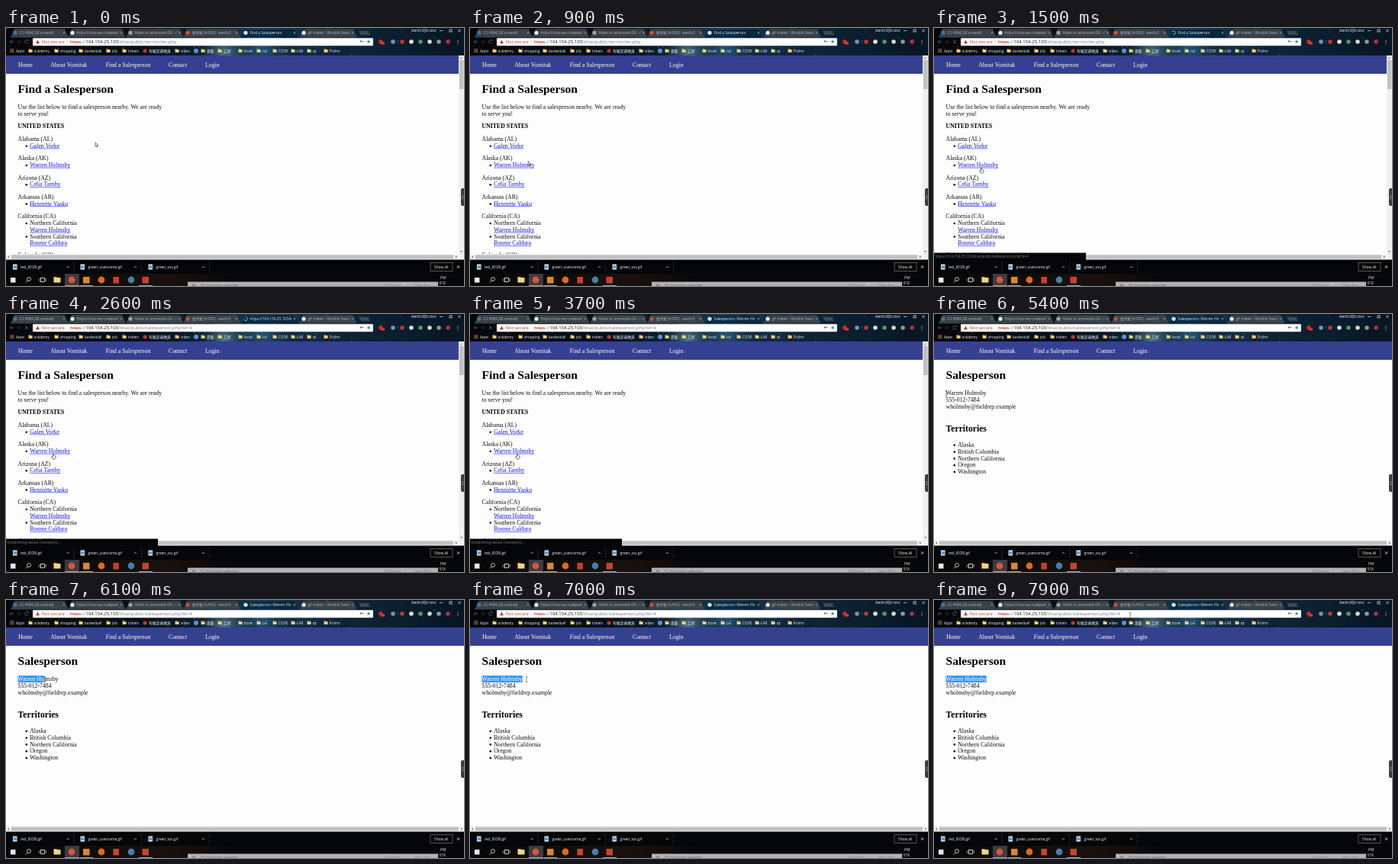
An HTML page with a canvas for the animation above (8 s loop, 600x338 px).

```html
<!DOCTYPE html>
<html lang="en">
<head>
<meta charset="utf-8">
<title>Find a Salesperson</title>
<style>
html, body { margin: 0; width: 100%; height: 100%; overflow: hidden; background: #000; }
canvas { display: block; width: 600px; height: 338px; }
</style>
</head>
<body>
<canvas id="stage" width="600" height="338"></canvas>
<script>
const g = document.getElementById('stage').getContext('2d');
const LOOP = 8000, STEP = 100;
const UI = '"Open Sans", "Noto Sans CJK TC", "Noto Sans CJK", sans-serif';
const SERIF = '"Liberation Serif", "Times New Roman", serif';
const BODY = 7.78;
const HOST = '104.154.25.103';
const PERSON = 'Warren Holmsby';

// Moments of the story, in ms
const CLICK = 1400, NAVIGATE = 2000, TITLED = 3200, LOADED = 4200, DRAG = 5500;

// Pointer path: time, x, y
const PATH = [
  [0, 117, 150], [300, 117, 150], [1200, 62, 183], [3900, 62, 183],
  [4600, 20, 106], [5200, 16, 104], [DRAG, 16, 104], [6100, 51, 104],
  [6500, 71, 104], [7000, 74, 104], [7800, 257, 20], [LOOP, 257, 20]
];

function box(x, y, w, h, color) {
  g.fillStyle = color;
  g.fillRect(x, y, w, h);
}

function dot(x, y, r, color) {
  g.fillStyle = color;
  g.beginPath();
  g.arc(x, y, r, 0, Math.PI * 2);
  g.fill();
}

function line(points, color, width = 0.8) {
  g.strokeStyle = color;
  g.lineWidth = width;
  g.beginPath();
  points.forEach(([x, y], i) => i ? g.lineTo(x, y) : g.moveTo(x, y));
  g.stroke();
}

function shape(points, color) {
  g.fillStyle = color;
  g.beginPath();
  points.forEach(([x, y]) => g.lineTo(x, y));
  g.closePath();
  g.fill();
}

function cross(x, y, r, color, width) {
  line([[x - r, y - r], [x + r, y + r]], color, width);
  line([[x + r, y - r], [x - r, y + r]], color, width);
}

function write(s, x, y, color, size = 4.8, family = UI, weight = '') {
  g.font = `${weight} ${size}px ${family}`;
  g.fillStyle = color;
  g.fillText(s, x, y);
  return x + g.measureText(s).width;
}

const serif = (s, x, y, color = '#111', size = BODY, weight = '') =>
  write(s, x, y, color, size, SERIF, weight);

function link(s, x, y) {
  const end = serif(s, x, y, '#1515e0');
  line([[x, y + 1], [end, y + 1]], '#1515e0', 0.6);
}

function seeded(seed) {
  return () => (seed = (seed * 16807) % 2147483647) / 2147483647;
}

function pointer(t) {
  const i = Math.max(1, PATH.findIndex(p => p[0] > t));
  const [a, ax, ay] = PATH[i - 1], [b, bx, by] = PATH[i];
  const u = (t - a) / (b - a), e = u * u * (3 - 2 * u);
  return [ax + (bx - ax) * e, ay + (by - ay) * e];
}

function sky() {
  const base = g.createLinearGradient(0, 0, 600, 0);
  base.addColorStop(0, '#05070a');
  base.addColorStop(0.3, '#07101a');
  base.addColorStop(0.55, '#12304a');
  base.addColorStop(1, '#081522');
  box(0, 0, 600, 36, base);
  const glow = (x, y, r, color) => {
    const f = g.createRadialGradient(x, y, 0, x, y, r);
    f.addColorStop(0, color);
    f.addColorStop(1, 'rgba(0,0,0,0)');
    box(0, 0, 600, 36, f);
  };
  glow(335, 24, 90, 'rgba(40,100,140,.7)');
  glow(285, 33, 45, 'rgba(120,170,195,.6)');
  glow(400, 10, 60, 'rgba(30,75,110,.6)');
  const rnd = seeded(77);
  for (let i = 0; i < 160; i++) {
    const x = i % 2 ? rnd() * 600 : 230 + rnd() * 200;
    dot(x, rnd() * 36, 0.2 + rnd() * 0.5, `rgba(190,220,240,${0.2 + rnd() * 0.6})`);
  }
}

function tab(x, title, icon, active) {
  const edge = [[x - 6, 12.5], [x - 1, 1], [x + 65, 1], [x + 70, 12.5]];
  shape(edge, active ? 'rgba(8,36,56,.75)' : '#3a4147');
  line(edge, active ? '#294657' : '#1d2226', 0.6);
  if (icon) dot(x, 6.3, 2.6, icon);
  g.save();
  g.beginPath();
  g.rect(x + 5, 0, 55, 12);
  g.clip();
  write(title, x + 5.5, 8, active ? '#d8ecf4' : '#aab4ba');
  g.restore();
  cross(x + 64, 6.3, 1.3, active ? '#d0dde2' : '#aab4ba', 0.6);
}

function tabs(t) {
  tab(12, 'CS 4984 (28 unread)', '#3b75a8');
  tab(87, 'https://courses.codepath', '#e8e8e8');
  tab(163, 'Video to animated GIF - c', '#9aa3a8');
  tab(238, '收件匣 (4,000) - wenlo3', '#d54b3e');
  tab(390, 'gif maker - Woobik Searc', '#e9e9e9');
  const waiting = t >= CLICK && t < TITLED;
  const title = t < NAVIGATE ? 'Find a Salesperson'
    : t < TITLED ? `https://${HOST}/blue` : 'Salesperson: ' + PERSON;
  tab(314, title, waiting ? '' : '#d7e4e8', true);
  if (waiting) {
    const a = t / 150;
    g.strokeStyle = '#9fc7dc';
    g.lineWidth = 0.9;
    g.beginPath();
    g.arc(314, 6.3, 2.3, a, a + 4.4);
    g.stroke();
  }
  shape([[462, 4], [474, 4], [477, 9], [465, 9]], 'rgba(90,100,108,.6)');
  write('wenlo3@z.test', 531, 5, '#eef');
  line([[568, 3.5], [572, 3.5]], '#eee', 0.7);
  g.strokeStyle = '#eee';
  g.strokeRect(581, 2, 3, 3);
  cross(594, 3.5, 1.7, '#eee', 0.7);
}

function toolbar(t) {
  const ink = '#596068', faint = '#2c3136';
  line([[10, 18], [5, 18], [7.5, 15.7]], ink);
  line([[5, 18], [7.5, 20.3]], ink);
  line([[14, 18], [19, 18], [16.5, 15.7]], faint);
  line([[19, 18], [16.5, 20.3]], faint);
  if (t >= CLICK && t < LOADED) {
    cross(27, 18, 2, ink, 0.9);
  } else {
    g.strokeStyle = ink;
    g.lineWidth = 0.8;
    g.beginPath();
    g.arc(27, 18, 2.3, 0.4, 5.4);
    g.stroke();
    shape([[27.5, 16.8], [29.8, 16.8], [29.8, 14.5]], ink);
  }
  g.fillStyle = '#fff';
  g.beginPath();
  g.roundRect(35, 13.2, 446, 10, 1.2);
  g.fill();
  shape([[41.5, 15.6], [44, 20.2], [39, 20.2]], '#c8392b');
  write('Not secure', 46.5, 20.2, '#c8392b', 6);
  line([[80.5, 15], [80.5, 21.5]], '#ccc', 0.5);
  let x = write('https', 84, 20.2, '#c8392b', 6);
  line([[84, 18.5], [x, 18.5]], '#c8392b', 0.5);
  x = write('://', x, 20.2, '#777', 6);
  x = write(HOST, x, 20.2, '#111', 6);
  write('/blue/public/' + (t < NAVIGATE ? 'territories.php' : 'salesperson.php?id=4'), x, 20.2, '#777', 6);
  dot(465, 17.5, 1.2, '#777');
  line([[466, 17.5], [469, 17.5]], '#777');
  shape(Array.from({ length: 10 }, (_, i) => {
    const a = i * Math.PI / 5 - Math.PI / 2, r = i % 2 ? 1.1 : 2.7;
    return [475 + r * Math.cos(a), 18 + r * Math.sin(a)];
  }), '#3f7de0');
  ['#cf2b2b', '#7d8fc0', '#c03434', '#e4e7e9', '#4f9a62', '#d6d8da', '#8e959b', '#b33236']
    .forEach((c, i) => dot([491, 507, 519, 531, 543, 555, 567, 579][i], 18, 2.8, c));
  box(491, 18.5, 5, 3.2, '#d33');
  for (let i = -1; i < 2; i++) dot(592, 18 + i * 2, 0.6, '#eee');
}

function bookmarks() {
  for (let i = 0; i < 9; i++) {
    box(5 + i % 3 * 1.8, 27.3 + Math.floor(i / 3) * 1.8, 1.2, 1.2, ['#e05545', '#57a35a', '#e8b93f'][i % 3]);
  }
  write('Apps', 13, 31.6, '#e8edf0');
  const items = [
    [32, 'academy'], [66, 'shopping'], [98, 'basketball'], [134, 'job'], [155, 'tickets'],
    [224, 'video'], [258, '書籤'], [280, '工具'], [307, 'book'], [331, 'cal'],
    [352, 'CODE'], [376, 'LAB'], [397, 'qt'], [419, 'Polimi']
  ];
  for (const [x, s] of items) {
    box(x - 2.4, 27.5, 2.4, 1, '#d9b250');
    box(x - 2.4, 28.2, 5, 3.8, '#f0d078');
    write(s, x + 4.8, 31.6, '#e8edf0');
  }
  dot(182, 30, 2.5, '#c8322d');
  write('有機認典教頁', 187, 31.8, '#e8edf0');
  dot(249, 30, 3, '#5795dc');
}

function territories() {
  serif('Find a Salesperson', 15.6, 85, '#000', BODY * 2, 'bold');
  serif('Use the list below to find a salesperson nearby. We are ready', 15.6, 106.2);
  serif('to serve you!', 15.6, 114.9);
  serif('UNITED STATES', 15.6, 131.4, '#000', BODY, 'bold');
  const states = [
    ['Alabama (AL)', 'Galen Vorke'], ['Alaska (AK)', PERSON],
    ['Arizona (AZ)', 'Celia Tarnby'], ['Arkansas (AR)', 'Henriette Vasko']
  ];
  states.forEach(([state, name], i) => {
    const y = 148.1 + i * 25.27;
    serif(state, 15.6, y);
    dot(26.8, y + 6.7, 1.3, '#111');
    link(name, 31.2, y + 8.8);
  });
  serif('California (CA)', 15.6, 249.3);
  [['Northern', PERSON], ['Southern', 'Bonnie Caldura']].forEach(([part, name], i) => {
    const y = 258.1 + i * 17.5;
    dot(26.8, y - 2.1, 1.3, '#111');
    serif(part + ' California', 31.2, y);
    link(name, 31.2, y + 8.8);
  });
  serif('Colorado (CO)', 15.6, 300.2);
}

// Number of letters of the name that the drag has covered
function selected(t, x) {
  if (t < DRAG) return 0;
  if (t > 6500) return PERSON.length;
  g.font = `${BODY}px ${SERIF}`;
  let n = 0;
  while (n < PERSON.length && 15.6 + g.measureText(PERSON.slice(0, n + 1)).width < x) n++;
  return n;
}

function profile(t, x) {
  serif('Salesperson', 15.6, 85, '#000', BODY * 2, 'bold');
  serif(PERSON, 15.6, 106.2);
  const part = PERSON.slice(0, selected(t, x));
  g.font = `${BODY}px ${SERIF}`;
  box(15.6, 99, g.measureText(part).width, 9, '#3297fd');
  serif(part, 15.6, 106.2, '#fff');
  serif('555-012-7484', 15.6, 115);
  serif('wholmsby@fieldrep.example', 15.6, 123.8);
  serif('Territories', 15.6, 154.4, '#000', BODY * 1.5, 'bold');
  ['Alaska', 'British Columbia', 'Northern California', 'Oregon', 'Washington'].forEach((s, i) => {
    const y = 174 + i * 8.75;
    dot(26.8, y - 2.1, 1.3, '#111');
    serif(s, 31.2, y);
  });
}

function page(t, x) {
  const long = t < LOADED;
  const right = long ? 593 : 600;
  box(0, 36, 600, 268, '#fdfdfd');
  box(0, 36, right, 24, '#354190');
  [[16, 'Home'], [58.3, 'About Vornitak'], [130.7, 'Find a Salesperson'], [213, 'Contact'], [261, 'Login']]
    .forEach(([left, s]) => serif(s, left, 50.8, '#fff'));
  g.save();
  g.beginPath();
  g.rect(0, 60, right, 236.5);
  g.clip();
  if (long) territories(); else profile(t, x);
  g.restore();

  box(0, 296.5, 600, 7, '#f1f1f1');
  box(7, 297.3, right - 14, 5.2, '#c1c1c1');
  shape([[4, 298.2], [4, 301.8], [2, 300]], '#777');
  shape([[right - 4, 298.2], [right - 4, 301.8], [right - 2, 300]], '#777');
  if (long) {
    box(593, 36, 7, 268, '#f1f1f1');
    box(594, 42, 5.5, 38, '#c1c1c1');
    shape([[594.8, 40.3], [598.2, 40.3], [596.5, 38.2]], '#777');
    shape([[594.8, 292], [598.2, 292], [596.5, 294]], '#777');
  }
  g.fillStyle = '#3b3d40';
  g.beginPath();
  g.roundRect(596, 210, 6, 23, 2);
  g.fill();
  for (let i = 0; i < 3; i++) box(597.5, 219 + i * 2, 2, 0.8, '#aaa');

  if (t >= 1000 && long) {
    box(0, 294.5, 199, 9.5, '#050607');
    write(t < NAVIGATE ? `https://${HOST}/blue/public/salesperson.php?id=4`
      : 'Establishing secure connection...', 1.5, 301, '#7b8083', 4.6);
  }
}

function downloads() {
  box(0, 303.5, 600, 18.5, '#050607');
  [[19, 'red_IDOR.gif'], [107.5, 'green_username.gif'], [196.5, 'green_xss.gif']].forEach(([x, s]) => {
    box(x - 10, 309.5, 5.5, 7, '#dbe8f2');
    box(x - 9.2, 311.2, 4, 3.6, '#4a94cc');
    write(s, x, 315.4, '#f0f0f0');
    line([[x + 60.5, 314], [x + 62, 312.3], [x + 63.5, 314]], '#ddd', 0.7);
    line([[x + 70, 306], [x + 70, 320]], '#333', 0.6);
  });
  g.strokeStyle = '#777';
  g.lineWidth = 0.7;
  g.strokeRect(556, 307.5, 29, 11);
  write('Show all', 561, 315, '#f0f0f0');
  cross(592.5, 313, 1.6, '#eee', 0.8);
}

function taskbar() {
  const base = g.createLinearGradient(0, 0, 300, 0);
  base.addColorStop(0, '#060708');
  base.addColorStop(0.7, '#1a110d');
  base.addColorStop(1, '#060708');
  box(0, 322, 600, 16, base);
  box(6, 327, 6.5, 6.5, '#e8e8e8');
  g.strokeStyle = '#eee';
  g.lineWidth = 0.8;
  g.beginPath();
  g.arc(30, 329, 2.4, 0, 7);
  g.stroke();
  line([[28.2, 331], [26, 333.5]], '#eee');
  g.strokeRect(45.5, 327.5, 5, 5);
  line([[43.8, 328], [43.8, 332]], '#bbb');
  line([[52.2, 328], [52.2, 332]], '#bbb');
  box(62.5, 326, 4, 2, '#d8a93c');
  box(62.5, 327, 9, 6.5, '#f3d57c');
  box(77, 322, 19, 16, '#3a3d40');
  dot(86, 330, 4.4, '#d9523f');
  box(101, 326, 8.5, 8.5, '#d88a2c');
  dot(125, 330, 4.4, '#e2682a');
  box(140.5, 326, 7.5, 8.5, '#c9402c');
  dot(164, 330, 4.4, '#447fb0');
  box(178.5, 326, 8.5, 8.5, '#c8402f');
  [[77, 19], [97, 17], [174, 18]].forEach(([x, w]) => box(x, 337, w, 1, '#7fb4de'));

  box(238, 332.5, 328, 5.5, '#b2b3b4');
  write('70 characters selected', 254, 338.6, '#66696b');
  write('Tab Size 4', 495, 338.6, '#7a7d7f');
  write('Plain Text', 535, 338.6, '#7a7d7f');
  box(244, 335.5, 4, 2.5, '#888');
  box(566, 322, 34, 16, '#060708');
  write('PM', 569, 328.7, '#eee');
  write('018', 567.5, 335.8, '#eee');
}

function cursor(t, x, y) {
  g.save();
  g.translate(x, y);
  if (t >= 4500) {
    line([[0, -3.5], [0, 3.5]], '#555', 0.7);
    line([[-1.4, -3.5], [1.4, -3.5]], '#555', 0.6);
    line([[-1.4, 3.5], [1.4, 3.5]], '#555', 0.6);
  } else {
    const hand = t >= 1000 && t < LOADED;
    shape(hand
      ? [[-0.6, 0], [0.6, 0], [0.7, 2.6], [3.2, 3.2], [3, 5.6], [2.2, 7], [-0.8, 7], [-2.6, 4.2], [-2, 3.6], [-0.6, 4.6]]
      : [[0, 0], [0, 5.2], [1.2, 4.2], [2, 6], [2.9, 5.6], [2.1, 3.9], [3.7, 3.8]], '#fff');
    g.lineWidth = 0.6;
    g.strokeStyle = '#222';
    g.stroke();
  }
  g.restore();
}

function draw(t) {
  const [x, y] = pointer(t);
  sky();
  tabs(t);
  toolbar(t);
  bookmarks();
  page(t, x);
  downloads();
  taskbar();
  cursor(t, x, y);
}

const start = performance.now();
function tick() {
  const t = (performance.now() - start) % LOOP;
  draw(Math.floor(t / STEP) * STEP);
  requestAnimationFrame(tick);
}
tick();
</script>
</body>
</html>
```
